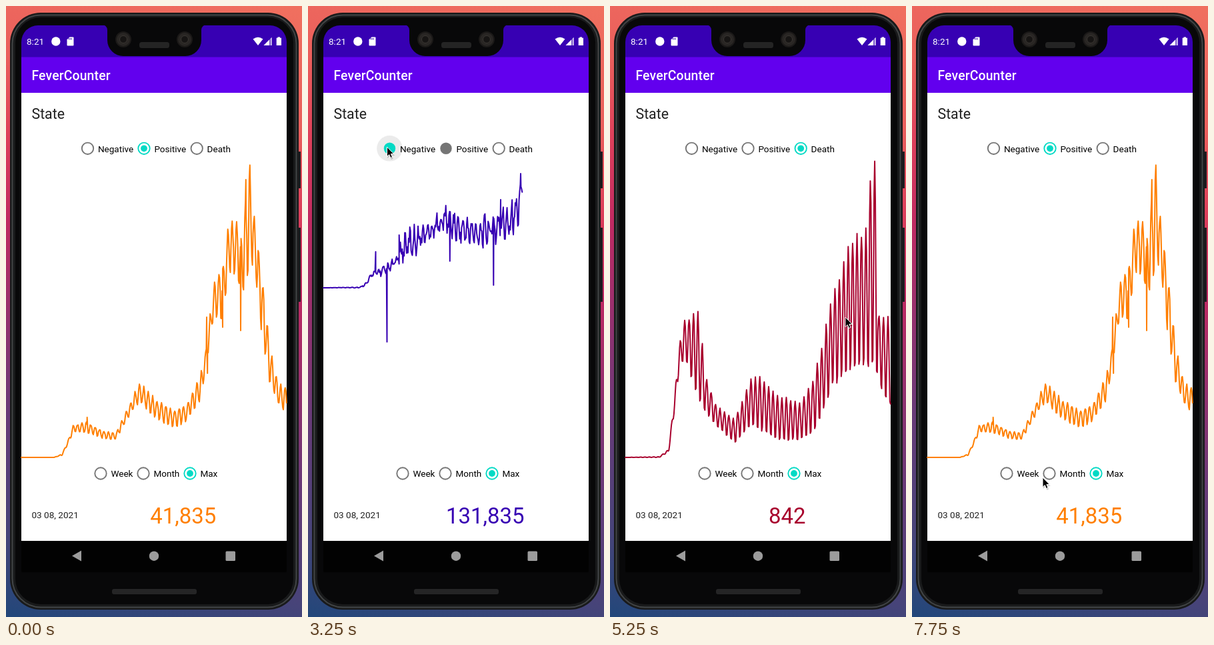
Recreate the animation shown at these times as an HTML page. Size 444 by 915 pixels, loop 8000 ms.

```html
<!DOCTYPE html>
<html lang="en">
<head>
<meta charset="utf-8">
<title>State chart</title>
<style>
  html, body { margin: 0; width: 100%; height: 100%; overflow: hidden; }
  svg { display: block; width: 444px; height: 915px; font: 13.55px Roboto, sans-serif; }
</style>
</head>
<body>
<svg viewBox="0 0 444 915">
  <defs>
    <linearGradient id="sky" gradientUnits="userSpaceOnUse" x1="0" y1="-110" x2="-241" y2="855">
      <stop offset="0" stop-color="#f0705f"/>
      <stop offset=".18" stop-color="#ea5f5c"/>
      <stop offset=".3" stop-color="#dd405b"/>
      <stop offset=".42" stop-color="#c02a62"/>
      <stop offset=".55" stop-color="#98306e"/>
      <stop offset=".7" stop-color="#693a78"/>
      <stop offset=".88" stop-color="#464479"/>
      <stop offset="1" stop-color="#22477a"/>
    </linearGradient>
    <clipPath id="screen"><rect x="23" y="29" width="398" height="840" rx="25"/></clipPath>
  </defs>
  <rect width="444" height="915" fill="url(#sky)"/>

  <!-- phone -->
  <path d="M437 218h5v55h-5zM437 332h5v111h-5z" fill="#1c1b1f"/>
  <rect x="6" y="10" width="433" height="894" rx="46" fill="#191a1b"/>
  <rect x="9.5" y="13.5" width="426" height="887" rx="43" fill="none" stroke="#424546" stroke-width="2"/>
  <rect x="14" y="17" width="417" height="879" rx="38" fill="#080809"/>
  <rect x="159" y="873" width="127" height="8" rx="3" fill="#252526"/>

  <g clip-path="url(#screen)">
    <rect x="23" y="29" width="398" height="48" fill="#3700b3"/>
    <rect x="23" y="76.5" width="398" height="54" fill="#6200ee"/>
    <rect x="23" y="130" width="398" height="671" fill="#fff"/>
    <rect x="23" y="801" width="398" height="47" fill="#020202"/>
  </g>
  <path d="M144 28a8 8 0 0 1 8 8v15a24 24 0 0 0 24 24h93a24 24 0 0 0 24-24v-15a8 8 0 0 1 8-8z" fill="#080809"/>
  <g fill="#292624" stroke="#1b1918" stroke-width="2">
    <circle cx="176" cy="50" r="11"/><circle cx="268" cy="50" r="11"/>
  </g>
  <g fill="#171514" stroke="#3b3733">
    <circle cx="176" cy="50" r="5.5"/><circle cx="268" cy="50" r="5.5"/>
  </g>
  <rect x="200" y="54" width="45" height="9" rx="3.5" fill="#242424"/>

  <!-- status bar and title -->
  <g fill="#fff">
    <text x="31" y="58">8:21</text>
    <circle cx="74.8" cy="53" r="6.7"/>
    <path d="M95.5 46.5h5q1 0 1 1v11q0 1-1 1h-8q-1 0-1-1v-8z"/>
    <path d="M370.5 49.5q7.5-5.5 15 0l-7.5 9.5z"/>
    <path d="M398.5 47v12h-12z" fill-opacity=".35"/>
    <path d="M395 50.5v8.5h-8.5zM398.5 47v12h-1.2v-10.8z"/>
    <path d="M407.5 46.5h3.5v1.300h2v11.2h-7.3v-11.2h1.8z"/>
    <text x="38.5" y="111" font-size="19.4" font-weight="500" letter-spacing=".15">FeverCounter</text>
  </g>
  <path d="M94.3 48v2.5M96.3 48v2.5M98.3 48v2.5" stroke="#3700b3" stroke-width=".9"/>

  <!-- navigation bar -->
  <g fill="#9c9c9c">
    <path d="M99 823.5l14-8v16z"/>
    <circle cx="222" cy="823.7" r="7.2"/>
    <rect x="329.5" y="816.5" width="14.5" height="14.5" rx="1.5"/>
  </g>

  <g fill="#212121">
    <text x="38.5" y="169" font-size="21.3">State</text>
    <text x="38.5" y="767">03 08, 2021</text>
  </g>
  <path id="line" fill="none" stroke-width="2" stroke-linejoin="round" stroke-linecap="round"/>
  <text id="count" x="265.7" y="775" font-size="32.9" text-anchor="middle"/>
  <circle id="ripple" cy="213.3" fill="#000" fill-opacity=".08"/>
  <g id="radios"/>
  <g id="cursor">
    <path d="M0 1V15.500L3.300 12.500L5.500 17.500L8.500 16.300L6.300 11.500H11Z" opacity=".18" transform="translate(.8 1.5)"/>
    <path d="M0 0V14.500L3.300 11.500L5.400 16.500L8 15.400L5.900 10.500H10.300Z" stroke="#fff"/>
  </g>
</svg>
<script>
const $ = id => document.getElementById(id);
const TEAL = '#03dac5', GRAY = '#757575';
const DAY = 0.947, WEEK = 7 * DAY;

const random = i => Math.abs(Math.sin(i * 12.9898) * 43758.5453) % 1;

// linear interpolation in rows of [position, value, value]
function between(rows, at) {
  const i = Math.max(1, rows.findIndex(r => r[0] >= at));
  const a = rows[i - 1], b = rows[i];
  const p = Math.min(1, Math.max(0, (at - a[0]) / (b[0] - a[0])));
  return [1, 2].map(n => a[n] + (b[n] - a[n]) * p);
}

// a weekly wave between the low and high trend, with daily noise and single outliers
function series({ trend, peak, noise, outliers }) {
  const points = [];
  for (let i = 0; i <= 420; i++) {
    const x = 23 + i * DAY;
    const [low, high] = between(trend, x);
    const wave = (0.5 + 0.5 * Math.cos(2 * Math.PI * (x - peak) / WEEK)) ** 0.8;
    points.push([x, low + (high - low) * (wave + noise * (random(i) - 0.5))]);
  }
  return points.concat(outliers).sort((a, b) => a[0] - b[0]);
}

// trend rows: x, y of the troughs, y of the peaks
const charts = [
  {
    color: '#3700b3', count: '131,835', peak: 146, noise: 0.8,
    trend: [[23, 422, 422], [78, 422, 421], [88, 417, 414], [96, 404, 399], [118, 402, 390],
      [132, 388, 378], [145, 380, 342], [175, 355, 332], [206, 335, 304], [222, 348, 318],
      [250, 356, 328], [285, 352, 312], [313, 335, 290], [320, 290, 258], [335, 330, 265],
      [350, 320, 255], [365, 328, 262], [400, 375, 300], [421, 372, 312]],
    outliers: [[101.5, 368], [118.5, 503], [136.7, 343], [212.8, 382], [278.3, 418],
      [289, 290], [319, 251], [330.3, 674], [341.5, 248], [362.3, 238]]
  },
  {
    color: '#ff7f00', count: '41,835', peak: 107.3, noise: 0.2,
    trend: [[23, 676, 676], [72, 676, 676], [84, 673, 671], [92, 658, 654], [101, 638, 628],
      [121, 640, 624], [150, 649, 638], [165, 649, 639], [186, 612, 596], [200, 593, 565],
      [222, 616, 588], [250, 632, 606], [270, 624, 598], [292, 592, 553], [299, 545, 520],
      [312, 465, 418], [326, 470, 385], [333, 405, 335], [345, 400, 316], [353, 440, 345],
      [365.8, 395, 238], [372.5, 400, 311], [386, 510, 428], [396, 570, 510], [408, 598, 566],
      [421, 612, 573]],
    outliers: [[121.7, 616], [301, 466], [302.2, 550], [325, 481], [352, 486], [359.8, 260]]
  },
  {
    color: '#a8002d', count: '842', peak: 112, noise: 0.08,
    trend: [[23, 676, 676], [74, 676, 675], [88, 668, 664], [97, 605, 585], [104, 545, 508],
      [112, 530, 472], [132, 600, 458], [145, 614, 560], [160, 630, 600], [187, 657, 618],
      [212, 632, 557], [227, 640, 557], [250, 654, 584], [285, 654, 595], [304, 643, 560],
      [318, 620, 510], [331, 580, 447], [358, 557, 360], [372, 545, 345], [386, 560, 340],
      [391, 550, 256], [398, 555, 238], [403, 570, 465], [421, 608, 470]],
    outliers: []
  }
];
charts.forEach(c => c.points = series(c));

const kinds = [[122.5, 'Negative'], [207, 'Positive'], [286.2, 'Death']];
const spans = [[142, 'Week'], [206, 'Month'], [276, 'Max']];

// press: step of the ripple; at: step of the switch; reach: end of the line at that step
const taps = [
  { press: 12, at: 13, pick: 0, reach: 322 },
  { press: 18, at: 18, pick: 2, reach: 331 },
  { press: 25, at: 26, pick: 1, reach: 348.5 }
];
// pointer rows: step, x, y
const moves = [[2, 322, 248], [4, 250, 167], [6, 136, 222], [8, 121, 209.5], [11, 121, 209.5],
  [12, 118.5, 211], [14, 118.5, 211], [17, 277, 211.5], [19, 285, 212], [21, 353, 466],
  [25, 206, 213.5], [27, 206, 214], [31, 196, 706]];

function radio([x, label], y, color, dot, ring = 8.7) {
  return `<circle cx="${x}" cy="${y}" r="${ring}" fill="none" stroke="${color}" stroke-width="1.9"/>
    <circle cx="${x}" cy="${y}" r="${dot}" fill="${color}"/>
    <text x="${x + 15.4}" y="${y + 5.2}">${label}</text>`;
}

function draw(step) {
  const done = taps.filter(t => t.at <= step);
  const [old, pick] = [1, 1, ...done.map(t => t.pick)].slice(-2);
  const tap = done.find(t => t.at === step);
  const chart = charts[pick];
  const end = tap ? tap.reach : 421;

  $('line').setAttribute('d', 'M' + chart.points.filter(p => p[0] <= end).join('L'));
  $('line').setAttribute('stroke', chart.color);
  $('count').setAttribute('fill', chart.color);
  $('count').textContent = chart.count;

  $('radios').innerHTML = kinds.map((kind, i) => {
    const color = i === pick ? TEAL : GRAY;
    if (tap && (i === pick || i === old)) return radio(kind, 213.3, color, 7.5, 7.8);
    return radio(kind, 213.3, color, i === pick ? 4.9 : 0);
  }).join('') + spans.map((span, i) =>
    i === 2 ? radio(span, 700, TEAL, 4.9) : radio(span, 700, GRAY, 0)).join('');

  const pressed = taps.find(t => step >= t.press && step <= t.at);
  $('ripple').setAttribute('r', !pressed ? 0 : tap ? 19.3 : 11);
  if (pressed) $('ripple').setAttribute('cx', kinds[pressed.pick][0]);

  $('cursor').style.display = step < 2 ? 'none' : '';
  $('cursor').setAttribute('transform', `translate(${between(moves, step)})`);
}

let current = -1;
function tick() {
  const step = Math.floor(performance.now() % 8000 / 250);
  if (step !== current) draw(current = step);
  requestAnimationFrame(tick);
}
tick();
</script>
</body>
</html>
```
